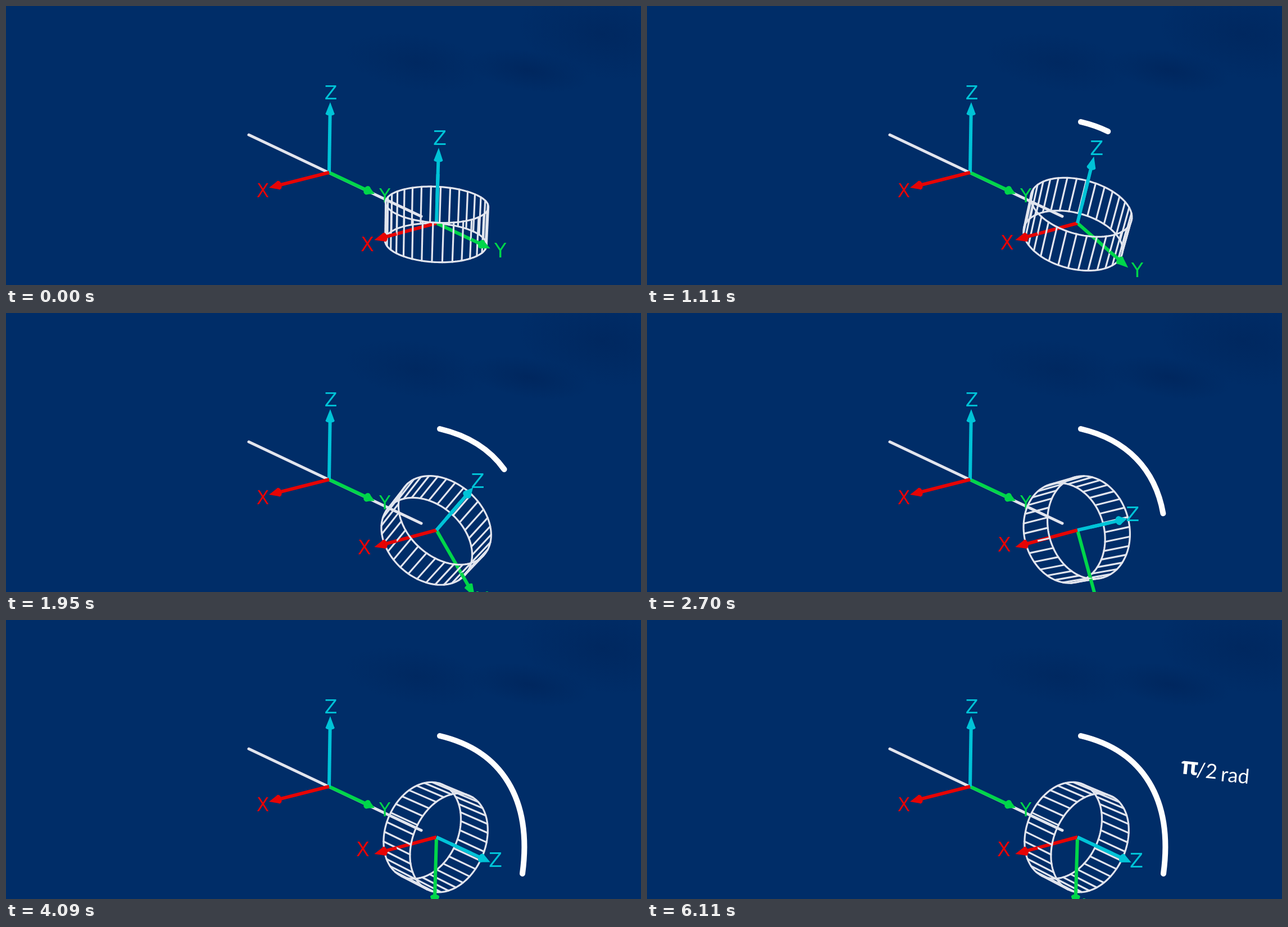
An HTML page with a canvas for the animation above (6180 ms loop, 1130x496 px).

```html
<!DOCTYPE html>
<html lang="en">
<head>
<meta charset="utf-8">
<title>Rotation about X</title>
<style>
  html, body { margin: 0; width: 100%; height: 100%; overflow: hidden; background: #002d68; }
  canvas { display: block; }
</style>
</head>
<body>
<canvas id="stage" width="1130" height="496"></canvas>
<script>
const ctx = document.getElementById('stage').getContext('2d');
const LOOP = 6180, RED = '#e60404', GREEN = '#00d64a', CYAN = '#00c3d7', WIRE = '#e2e5ee';
const FOCUS = 2000, RADIUS = 0.65, HALF = 0.26, RIBS = 32;
const ORIGIN = [766, 386];

// Axis vectors: screen x, screen y, depth towards the viewer
const X = [-106, 28.6, 86], Y = [91.2, 42.75, 95], Z = [3.9, -130.2, 55];

const clamp = v => Math.min(1, Math.max(0, v));
const ease = v => (v = clamp(v), v * v * (3 - 2 * v));
const mix = (a, p, b, q) => a.map((v, i) => v * p + b[i] * q);
const lerp = (a, b, k) => a.map((v, i) => v + (b[i] - v) * k);

function project(v) {
  const k = 1 / (1 - v[2] / FOCUS);
  return [ORIGIN[0] + v[0] * k, ORIGIN[1] + v[1] * k];
}

function line(a, b, color, width, cap = 'butt') {
  ctx.strokeStyle = color;
  ctx.lineWidth = width;
  ctx.lineCap = cap;
  ctx.beginPath();
  ctx.moveTo(...a);
  ctx.lineTo(...b);
  ctx.stroke();
}

// Shaft and cone; the cone's round base opens as the axis turns to the viewer
function arrow(from, tip, color, start, fullLength) {
  const base = lerp(from, tip, 0.835), r = 8;
  const dx = tip[0] - from[0], dy = tip[1] - from[1], length = Math.hypot(dx, dy);
  const depth = Math.sqrt(Math.max(0, 1 - (length / fullLength) ** 2));
  line(lerp(from, tip, start), base, color, 6);
  ctx.save();
  ctx.translate(...base);
  ctx.rotate(Math.atan2(dy, dx));
  ctx.fillStyle = color;
  ctx.beginPath();
  ctx.ellipse(0, 0, r * depth, r, 0, 0, 2 * Math.PI);
  ctx.fill();
  ctx.beginPath();
  ctx.moveTo(0, -r);
  ctx.lineTo(length * 0.165, 0);
  ctx.lineTo(0, r);
  ctx.fill();
  ctx.restore();
}

function label(text, x, y, color, size) {
  ctx.font = size + 'px "DejaVu Sans", sans-serif';
  ctx.textAlign = 'center';
  ctx.fillStyle = color;
  ctx.fillText(text, x, y + size * 0.364);
}

function shade(x, y, rx, ry, color) {
  ctx.save();
  ctx.translate(x, y);
  ctx.rotate(0.15);
  ctx.scale(rx, ry);
  const g = ctx.createRadialGradient(0, 0, 0, 0, 0, 1);
  g.addColorStop(0, color);
  g.addColorStop(1, 'rgba(0,30,80,0)');
  ctx.fillStyle = g;
  ctx.fillRect(-1, -1, 2, 2);
  ctx.restore();
}

function background() {
  ctx.fillStyle = '#002d68';
  ctx.fillRect(0, 0, 1130, 496);
  shade(730, 100, 130, 50, 'rgba(0,30,80,.3)');
  shade(930, 115, 110, 36, 'rgba(0,30,80,.4)');
  shade(1060, 50, 150, 80, 'rgba(0,30,80,.35)');
}

function fixedAxes() {
  const o = [575, 296], size = 33, length = 136;
  line([432, 229], [739, 374], WIRE, 5, 'round');
  label('Y', 674, 337, GREEN, size);
  arrow(o, [656, 334], GREEN, 0, length);
  arrow(o, [577, 171], CYAN, 0, length);
  arrow(o, [468, 323], RED, 0, length);
  label('X', 457, 328, RED, size);
  label('Z', 578, 154, CYAN, size);
}

function drum(y, z, front) {
  const radial = i => {
    const a = i * 2 * Math.PI / RIBS;
    return mix(X, RADIUS * Math.cos(a), y, RADIUS * Math.sin(a));
  };
  const edge = (i, h) => project(mix(radial(i), 1, z, h));
  for (let i = 0; i < RIBS; i++) {
    if ((radial(i)[2] > 0) === front) line(edge(i, -HALF), edge(i, HALF), WIRE, 3.2);
    if ((radial(i + 0.5)[2] > 0) !== front) continue;
    for (const h of [-HALF, HALF]) {
      ctx.strokeStyle = WIRE;
      ctx.lineWidth = 3.2;
      ctx.lineCap = 'round';
      ctx.beginPath();
      for (let k = 0; k <= 4; k++) ctx.lineTo(...edge(i + k / 4, h));
      ctx.stroke();
    }
  }
}

function movingAxes(turn) {
  const a = turn * Math.PI / 2, c = Math.cos(a), s = Math.sin(a);
  const y = mix(Y, c, Z, -s), z = mix(Z, c, Y, s);
  const tipX = project(X), tipY = project(y), tipZ = project(z);
  const size = 35, length = 146;

  drum(y, z, false);
  line(ORIGIN, lerp(ORIGIN, tipY, 0.65), GREEN, 6);
  line(ORIGIN, lerp(ORIGIN, tipX, 0.65), RED, 6);
  line(ORIGIN, lerp(ORIGIN, tipZ, 0.65), CYAN, 6);
  drum(y, z, true);
  arrow(ORIGIN, tipY, GREEN, 0.64, length);
  arrow(ORIGIN, tipX, RED, 0.64, length);
  arrow(ORIGIN, tipZ, CYAN, 0.27, length);

  label('X', 643 - 8 * s, 423 - 16 * turn, RED, size);
  label('Y', tipY[0] + 18 - 11 * turn, tipY[1] + 3 + 4 * Math.sin(2 * a) - 7 * turn, GREEN, size);
  label('Z', tipZ[0] + 2 + 8 * Math.sin(1.3 * a), tipZ[1] - 18 + 14 * turn, CYAN, size);
}

function sweep(amount) {
  if (amount <= 0) return;
  const length = 326;
  ctx.strokeStyle = '#fff';
  ctx.lineWidth = 10;
  ctx.lineCap = 'round';
  if (amount < 1) ctx.setLineDash([length * amount, 1000]);
  ctx.beginPath();
  ctx.moveTo(772, 206);
  ctx.bezierCurveTo(882, 232, 937, 318, 919, 451);
  ctx.stroke();
  ctx.setLineDash([]);
}

function caption(alpha) {
  if (alpha <= 0) return;
  ctx.save();
  ctx.globalAlpha = alpha;
  ctx.translate(949, 273);
  ctx.rotate(0.1);
  ctx.fillStyle = '#fff';
  ctx.textAlign = 'left';
  ctx.font = 'bold 42px "Open Sans", sans-serif';
  ctx.fillText('π', 0, 0);
  ctx.font = '36px Lato, sans-serif';
  ctx.fillText('/2', 28, 3);
  ctx.fillText('rad', 72, 6);
  ctx.restore();
}

function draw(now) {
  const t = now % LOOP;
  background();
  fixedAxes();
  movingAxes(ease(t / 4200));
  sweep(ease((t - 50) / 4230));
  caption(clamp((t - 5140) / 500));
  requestAnimationFrame(draw);
}
requestAnimationFrame(draw);
</script>
</body>
</html>
```
